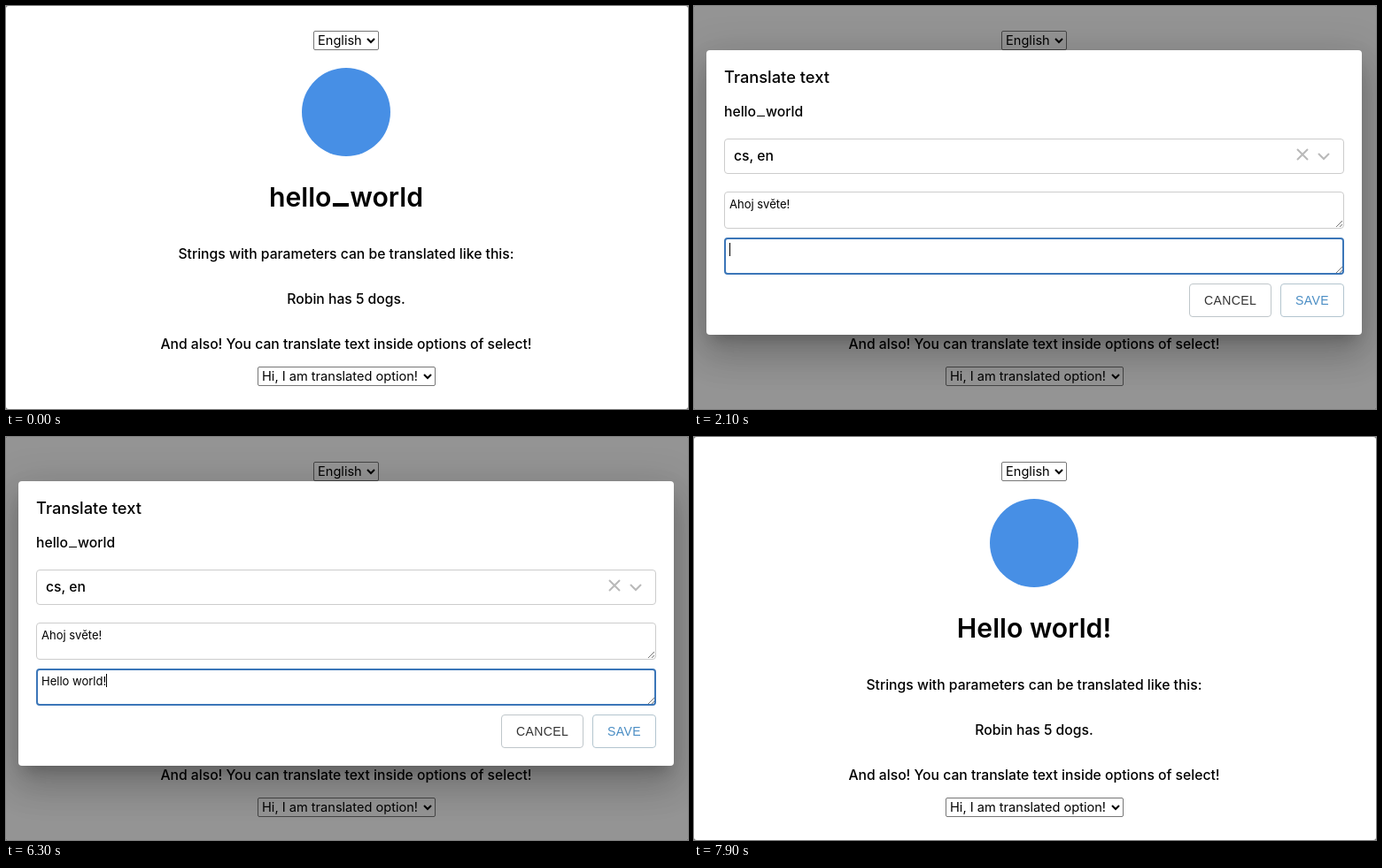
Animation, 770 px wide and 456 px high, one loop 8 s. Source, as an HTML page:

```html
<!DOCTYPE html>
<html lang="en">
<head>
<meta charset="utf-8">
<title>Translate in context</title>
<style>
  html, body { margin: 0; width: 100%; height: 100%; overflow: hidden; background: #777; }
  #stage {
    position: absolute; left: 0; top: 0; width: 770px; height: 456px; overflow: hidden;
    background: #fff; border-radius: 3px; color: #000; font: 450 15.7px/0 Inter, sans-serif;
  }
  #stage div, #stage svg { position: absolute; box-sizing: border-box; }

  /* --y is the text baseline */
  #stage .t { top: calc(var(--y) * 1px - .364em); white-space: pre; }
  #stage .mid { left: 384px; transform: translateX(-50%); }
  .h1 { font-size: 30.2px; font-weight: 600; }
  .pick { font-size: 14.6px; font-weight: 400; }
  .small { font-size: 13px; font-weight: 400; }
  .bar {
    display: inline-block; overflow: hidden; width: .62em; height: .1em;
    margin: 0 .04em; background: currentColor;
  }

  .select { border: 1px solid #767676; border-radius: 2px; background: #fff; height: 22px; }
  #logo { left: 334px; top: 70px; width: 100px; height: 100px; border-radius: 50%; background: #478fe5; }
  #glow { left: 295px; top: 196px; width: 178px; height: 38px; background: #e6f4ff; }

  #modal { inset: 0; }
  #shade { inset: 0; background: rgba(0, 0, 0, .42); }
  #card {
    left: 14px; top: 50px; width: 740px; height: 322px; border-radius: 4px; background: #fff;
    box-shadow: 0 11px 15px -7px rgba(0,0,0,.2), 0 24px 38px 3px rgba(0,0,0,.14), 0 9px 46px 8px rgba(0,0,0,.12);
  }
  .field { left: 34px; width: 700px; height: 42px; border: 1px solid #ccc; border-radius: 4px; background: #fff; }
  .field.focus { border: 2px solid #3b76b8; }
  #caret { position: absolute; top: -8.5px; width: 1px; height: 15px; background: #000; }

  .btn {
    top: 314px; height: 38px; border: 1px solid #bfc6ca; border-radius: 4px; background: #fff;
    color: #333; font: 14px/36px "Liberation Sans", Arial, sans-serif; letter-spacing: .4px;
    text-align: center; white-space: pre;
  }
  #cancel { width: 93px; }
  #save { right: 36px; width: 72px; border-color: #b3c5cf; }
  #save.ready { color: #4a8dc4; }
  #save.done { width: 102px; background: #d9d9d9; border-color: #b5b5b5; color: #333; }
  .tick { font-family: "DejaVu Sans", sans-serif; }
  svg { left: 0; top: 0; fill: none; }
</style>
</head>
<body>
<div id="stage">
  <div class="select" style="left:347px;top:28px;width:74px"></div>
  <div class="t pick" style="left:352px;--y:44">English</div>
  <div id="logo"></div>
  <div id="glow"></div>
  <div class="t mid h1" id="title" style="--y:226.5"></div>
  <div class="t mid" style="--y:287">Strings with parameters can be translated like this:</div>
  <div class="t mid" style="--y:338">Robin has 5 dogs.</div>
  <div class="t mid" style="--y:389">And also! You can translate text inside options of select!</div>
  <div class="select" style="left:284px;top:408px;width:201px"></div>
  <div class="t pick" style="left:289px;--y:424">Hi, I am translated option!</div>
  <svg width="770" height="456" stroke="#000" stroke-width="2">
    <path d="M408 37l4 4 4-4M472 417l4 4 4-4"/>
  </svg>

  <div id="modal">
    <div id="shade"></div>
    <div id="card"></div>
    <div class="t" style="left:34px;--y:87;font-size:18.3px;font-weight:500">Translate text</div>
    <div class="t" style="left:34px;--y:126">hello<span class="bar">_</span>world</div>
    <div class="field" style="top:150px;height:40px"></div>
    <div class="t" style="left:45px;--y:176">cs, en</div>
    <div class="field" style="top:210px"></div>
    <div class="field" id="entry" style="top:262px"></div>
    <svg width="770" height="456">
      <path stroke="#b9b9b9" stroke-width="2" d="M681 162l12 12M693 162l-12 12M705 167l6 6 6-6"/>
      <path id="grips" stroke="#777" d="M725 250l7-7M729 250l3-3M725 302l7-7M729 302l3-3"/>
    </svg>
    <div class="t small" id="czech" style="left:40px;--y:229">Ahoj světe!</div>
    <div class="t small" style="left:40px;--y:281"><span id="typed"></span><i id="caret"></i></div>
    <div class="btn" id="cancel">CANCEL</div>
    <div class="btn" id="save"></div>
  </div>
</div>

<script>
const LOOP = 8000;
const GREETING = 'Hello world!';
const KEY_HTML = 'hello<span class="bar">_</span>world';
const SAVED_HTML = 'SAVED! <span class="tick">✓</span>';

// Each track is a list of [time in ms, value], held until the next step.
const tracks = {
  glow: [[0, 0], [1000, .5], [1100, 1], [1600, 0]],
  modal: [[0, 0], [1600, 1], [6900, .5], [7000, 0]],
  loaded: [[0, 0], [1700, 1]],
  focus: [[0, 0], [2100, 1], [6400, 0]],
  caret: [[0, 0], [2100, 1], [2600, 0], [2800, 1], [4700, 0], [4800, 1], [5300, 0], [5800, 1], [6400, 0]],
  typed: [0, 2800, 3000, 3300, 3400, 3600, 3700, 3800, 3900, 4000, 4200, 4300, 4800].map((t, n) => [t, n]),
  saved: [[0, 0], [6600, 1]],
  renamed: [[0, 0], [6900, 1]]
};

const $ = id => document.getElementById(id);
const at = (name, t) => tracks[name].findLast(step => step[0] <= t)[1];
const show = (id, on) => { $(id).style.visibility = on ? 'inherit' : 'hidden'; };
const fade = (id, value) => {
  $(id).style.opacity = value;
  $(id).style.visibility = value ? 'visible' : 'hidden';
};

function setHtml(id, html) {
  const el = $(id);
  if (el.shown !== html) el.innerHTML = el.shown = html;
}

function render(t) {
  const loaded = at('loaded', t), saved = at('saved', t);
  fade('glow', at('glow', t));
  fade('modal', at('modal', t));
  setHtml('title', at('renamed', t) ? GREETING : KEY_HTML);
  show('grips', loaded);
  show('czech', loaded);
  $('entry').classList.toggle('focus', !!at('focus', t));
  show('caret', at('caret', t));
  setHtml('typed', GREETING.slice(0, at('typed', t)));
  setHtml('save', saved ? SAVED_HTML : 'SAVE');
  $('save').className = 'btn' + (saved ? ' done' : loaded ? ' ready' : '');
  $('cancel').style.left = saved ? '529px' : '559px';
}

const start = performance.now();
function tick() {
  render((performance.now() - start) % LOOP);
  requestAnimationFrame(tick);
}
tick();
</script>
</body>
</html>
```
